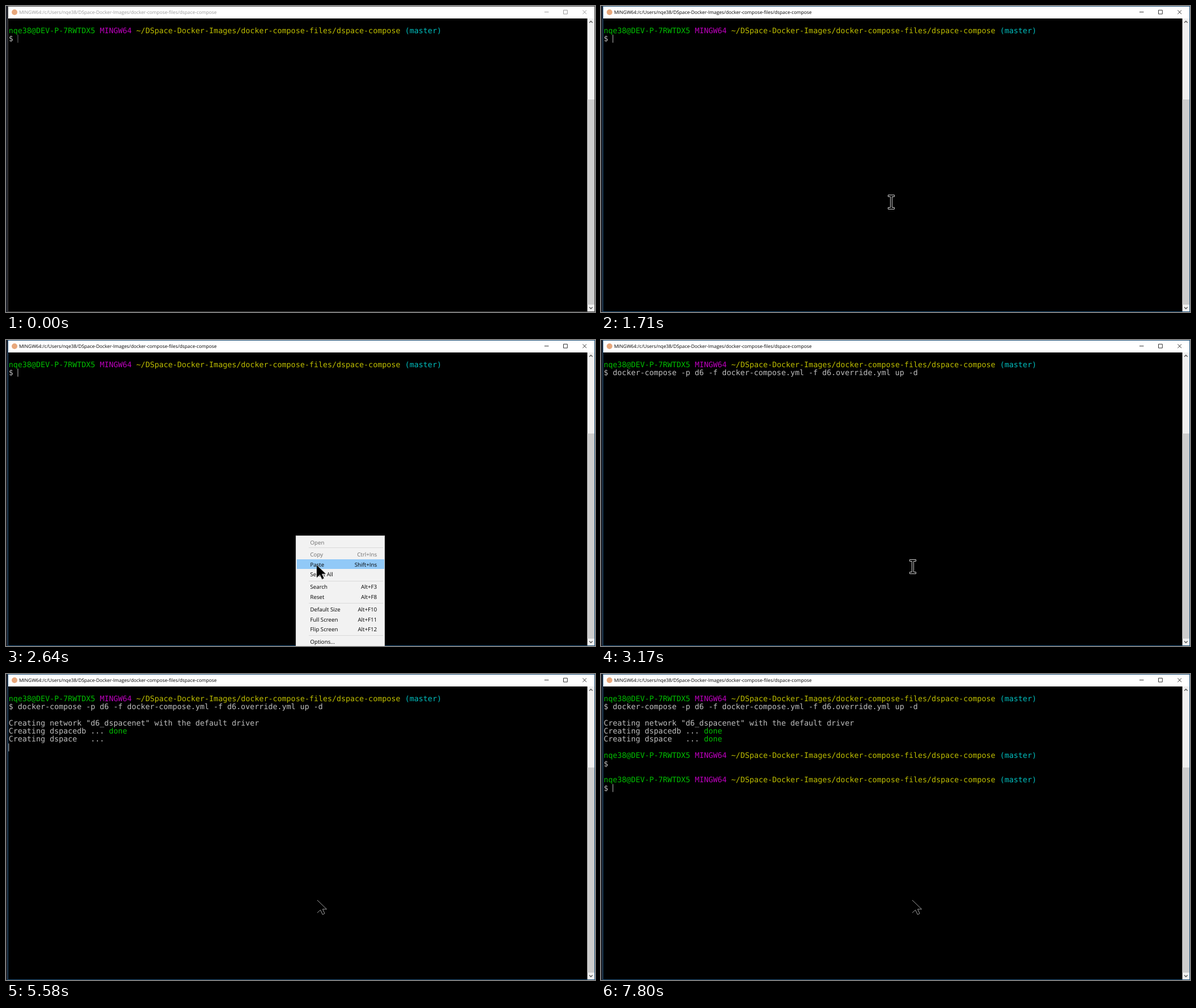
Write an HTML page with a canvas that moves like this. It is 1037 px wide and 540 px high and loops after 8 s.

```html
<!DOCTYPE html>
<html>
<head>
<meta charset="utf-8">
<style>
html, body { margin: 0; height: 100%; overflow: hidden; background: #000; }
canvas { display: block; }
</style>
</head>
<body>
<canvas id="stage" width="1037" height="540"></canvas>
<script>
const ctx = document.getElementById('stage').getContext('2d');
const LOOP = 8000, COL = 8.02, ROW = 14.35, LEFT = 4.8, TOP = 36.4;
const GREEN = '#00bf00', MAGENTA = '#bf00bf', YELLOW = '#bfbf00', CYAN = '#00bfbf', GRAY = '#bfbfbf';
const MONO = '13.32px "DejaVu Sans Mono", monospace';
const UI = '"Open Sans", "Noto Sans", sans-serif';
const USER = 'nqe38', HOST = 'DEV-P-7RWTDX5';
const DIR = 'DSpace-Docker-Images/docker-compose-files/dspace-compose';
const COMMAND = 'docker-compose -p d6 -f docker-compose.yml -f d6.override.yml up -d';

// Row centre, label, shortcut, disabled
const MENU = [
  [357, 'Open', '', true],
  [378.5, 'Copy', 'Ctrl+Ins', true],
  [396, 'Paste', 'Shift+Ins'],
  [413.5, 'Select All', ''],
  [435.5, 'Search', 'Alt+F3'],
  [453, 'Reset', 'Alt+F8'],
  [475, 'Default Size', 'Alt+F10'],
  [493, 'Full Screen', 'Alt+F11'],
  [510.5, 'Flip Screen', 'Alt+F12'],
  [532.5, 'Options...', '']
];

// Time from which the caret sits at a row and column
const CARET = [[0, 1, 2], [2780, 2, 0], [4010, 3, 0], [4270, 4, 0], [4660, 5, 0], [5580, 6, 0], [6750, 11, 2]];
const CARET_OFF = [[2120, 2640], [3170, 3740], [5190, 5580], [6100, 6490], [7270, 7800]];

function rect(x, y, w, h, color) {
  ctx.fillStyle = color;
  ctx.fillRect(x, y, w, h);
}

function label(text, x, y, font, color, align = 'left') {
  ctx.font = font;
  ctx.fillStyle = color;
  ctx.textAlign = align;
  ctx.fillText(text, x, y);
}

function line(points, color, width = 1, close = false, fill) {
  ctx.beginPath();
  points.forEach(([x, y]) => ctx.lineTo(x, y));
  if (close) ctx.closePath();
  if (fill) {
    ctx.fillStyle = fill;
    ctx.fill();
  }
  ctx.strokeStyle = color;
  ctx.lineWidth = width;
  ctx.stroke();
}

function term(row, col, text, color = GRAY) {
  label(text, LEFT + col * COL, TOP + row * ROW + 11.3, MONO, color);
}

function prompt(row) {
  term(row, 0, USER + '@' + HOST, GREEN);
  term(row, 20, 'MINGW64', MAGENTA);
  term(row, 28, '~/' + DIR, YELLOW);
  term(row, 87, '(master)', CYAN);
  term(row + 1, 0, '$');
}

function drawWindow(active) {
  const ink = active ? '#000' : '#999', button = active ? '#333' : '#999';
  const border = active ? '#1c4f78' : '#444';
  rect(0, 0, 1037, 540, '#000');
  rect(0, 0, 3, 540, '#20232c');
  rect(3, 0, 1, 540, border);
  rect(4, 0, 1032, 22, '#fff');
  rect(4, 0, 1032, 1, border);
  ctx.fillStyle = '#e8a87c';
  ctx.beginPath();
  ctx.arc(15, 11, 5, 0, 7);
  ctx.fill();
  label('MINGW64:/c/Users/' + USER + '/' + DIR, 23, 14.3, '8.32px ' + UI, ink);
  line([[948, 10.7], [955.5, 10.7]], button);
  line([[981.5, 7.3], [988.3, 7.3], [988.3, 14.1], [981.5, 14.1]], button, 1, true);
  line([[1015.3, 7.5], [1022, 14.2]], button);
  line([[1022, 7.5], [1015.3, 14.2]], button);

  rect(1023.5, 22, 12.5, 517, '#f0f0f0');
  rect(1023.5, 165, 12.5, 362, '#cdcdcd');
  line([[1027, 29.5], [1029.8, 26.7], [1032.6, 29.5]], '#505050', 1.3);
  line([[1027, 531.5], [1029.8, 534.3], [1032.6, 531.5]], '#505050', 1.3);
  rect(4, 539, 1033, 1, border);
  rect(1036, 0, 1, 540, border);
}

function drawTerminal(t) {
  prompt(0);
  if (t >= 2780) term(1, 2, COMMAND);
  if (t >= 4270) term(3, 0, 'Creating network "d6_dspacenet" with the default driver');
  if (t >= 4660) term(4, 0, 'Creating dspacedb ...');
  if (t >= 5580) {
    term(4, 22, 'done', GREEN);
    term(5, 0, 'Creating dspace   ...');
  }
  if (t >= 6490) term(5, 22, 'done', GREEN);
  if (t >= 6750) {
    prompt(7);
    prompt(10);
  }
  if (CARET_OFF.some(([from, to]) => t >= from && t < to)) return;
  const [, row, col] = CARET.filter(c => t >= c[0]).pop();
  rect(LEFT + col * COL - 0.4, TOP + row * ROW, 1, 14, t < 1710 ? '#707070' : GRAY);
}

function menuItem([y, name, keys, disabled], selected) {
  const color = disabled ? '#6d6d6d' : '#000', font = '9.7px ' + UI;
  if (selected) rect(512, y - 9, 154, 17, '#91c9f7');
  label(name, 535.5, y + 3.5, font, color);
  label(keys, 653, y + 3.5, font, color, 'right');
}

function drawMenu(pointerY) {
  rect(510, 345, 157, 195, '#ccc');
  rect(511, 346, 155, 194, '#f2f2f2');
  for (const y of [366, 425, 464, 521]) rect(533, y, 131, 1, '#d9d9d9');
  MENU.forEach(item => menuItem(item, item[1] === 'Paste' && pointerY >= 387 && pointerY < 405));
}

function at(x, y, points) {
  return points.map(([a, b]) => [x + a, y + b]);
}

function arrow(x, y) {
  const shape = [[0, 0], [16.5, 16], [9.5, 16], [13, 23.5], [9.5, 25.5], [5.5, 17.5], [0, 22.5]];
  line(at(x, y, shape), '#c8c8c8', 0.8, false, '#000');
}

function beam(x, y) {
  const half = [[-1.5, -9.5], [-5.5, -9.5], [-5.5, -12.5], [5.5, -12.5], [5.5, -9.5], [1.5, -9.5]];
  line(at(x, y, half.concat(half.map(([a, b]) => [-a, -b]))), '#d0d0d0', 1, true, '#000');
}

// Pointer progress, held for 130 ms at a time
function held(t, start, steps, first) {
  const k = Math.floor((t - start) / 130) + first;
  return Math.max(0, Math.min(1, k / steps));
}

function draw(t) {
  drawWindow(t >= 1710);
  drawTerminal(t);

  if (t >= 920 && t < 1850) {
    const rest = (1 - held(t, 920, 5, 0)) ** 2;
    beam(511 + 200 * rest, 346 + 106 * rest);
  } else if (t >= 1850 && t < 2780) {
    const p = held(t, 1980, 6, 1), e = p * p * (3 - 2 * p);
    const x = 510 + 37 * e, y = 345 + 52 * e;
    drawMenu(y);
    arrow(x, y);
  } else if (t >= 2780 && t < 3740) {
    // The chosen item fades after the menu closes
    const fade = 0.6 * (1 - held(t, 2780, 3, 0));
    if (fade > 0) {
      ctx.globalAlpha = fade;
      menuItem(MENU[2], true);
      ctx.globalAlpha = 1;
    }
    beam(549, 400);
  } else if (t >= 3740) {
    arrow(548, 399);
  }
}

ctx.textRendering = 'geometricPrecision';
const begin = performance.now();
function tick() {
  draw((performance.now() - begin) % LOOP);
  requestAnimationFrame(tick);
}
tick();
</script>
</body>
</html>
```
